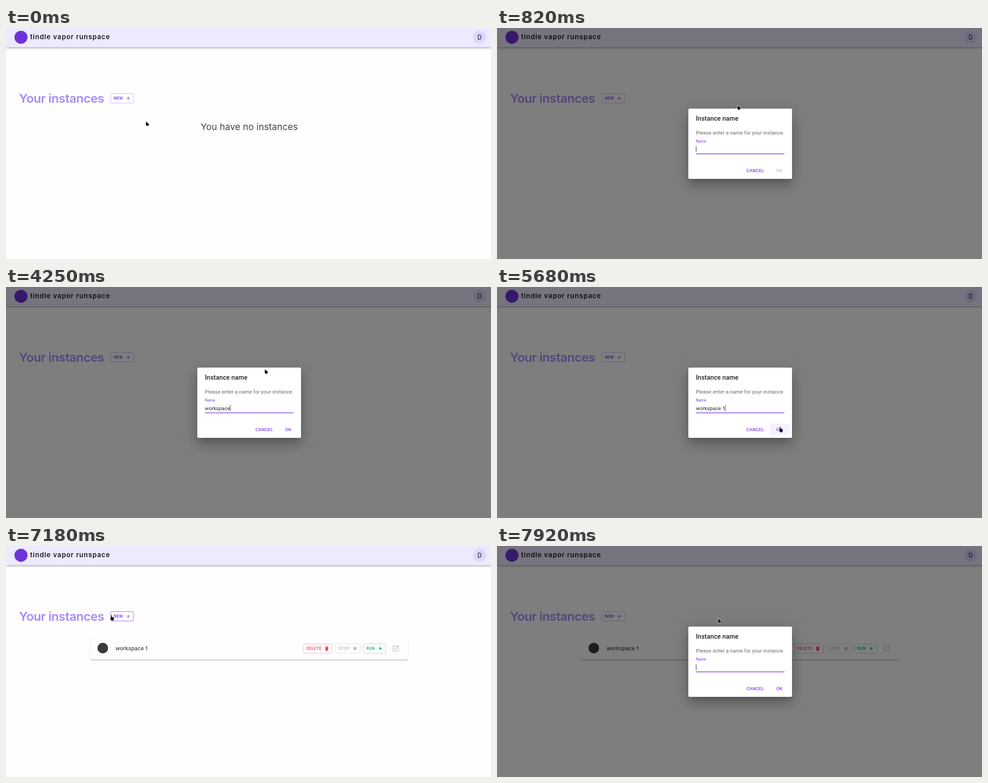
An HTML page that plays this animation: 1085 by 516 pixels, repeating every 7.99 s.

```html
<!DOCTYPE html>
<html lang="en">
<head>
<meta charset="utf-8">
<title>Instances</title>
<style>
  html, body { margin: 0; width: 100%; height: 100%; overflow: hidden; background: #fefefe; }
  #stage { position: absolute; left: 0; top: 0; width: 1085px; height: 516px; overflow: hidden; background: #fefefe; }
  .layer, svg { position: absolute; left: 0; top: 0; width: 1085px; height: 516px; }
  .box { position: absolute; }
  #header { left: 0; top: 0; width: 1085px; height: 43px; background: #ede9fe;
    box-shadow: 0 1.4px 2.8px -.7px rgba(0,0,0,.2), 0 2.8px 3.6px rgba(0,0,0,.14), 0 .7px 7px rgba(0,0,0,.12); }
  #card { opacity: 0; transform-origin: 544px 229.5px; }
  #cardBox { left: 188px; top: 204.5px; width: 712px; height: 49.5px; border-radius: 5px; background: #fefefe;
    box-shadow: 0 2px 1px -1px rgba(0,0,0,.2), 0 1px 1px rgba(0,0,0,.14), 0 1px 3px rgba(0,0,0,.14); }
  #backdrop { background: rgba(0,0,0,.5); opacity: 0; }
  #dialog { opacity: 0; }
  #dialogBox { left: 428px; top: 179.5px; width: 232px; height: 157px; border-radius: 3px; background: #fff;
    box-shadow: 0 8px 11px -5px rgba(0,0,0,.2), 0 17px 27px 2px rgba(0,0,0,.14), 0 6px 33px 6px rgba(0,0,0,.12); }
  text { font-family: Roboto, sans-serif; white-space: pre; }
  .inter { font-family: Inter, sans-serif; }
  .body { font-size: 11.38px; letter-spacing: .107px; }
  .action { font-size: 9.95px; font-weight: 500; letter-spacing: .284px; }
  .small { font-size: 9.24px; font-weight: 500; letter-spacing: .264px; fill: currentColor; }
  .button rect { fill: none; stroke: currentColor; stroke-width: .8; stroke-opacity: .5; }
  .button path { fill: currentColor; }
  .ripple { fill: #7c3aed; opacity: 0; }
  #accent { transform-box: fill-box; transform-origin: center; }
</style>
</head>
<body>
<div id="stage">
  <div id="header" class="box"></div>
  <svg viewBox="0 0 1085 516">
    <defs>
      <clipPath id="newClip"><rect x="234" y="146.5" width="52" height="21" rx="3"/></clipPath>
      <clipPath id="okClip"><rect x="611" y="305" width="44" height="26" rx="3"/></clipPath>
    </defs>
    <circle cx="33.5" cy="20.8" r="14.6" fill="#6d33d8"/>
    <text class="inter" x="54" y="24.5" font-size="15" font-weight="600" letter-spacing="1" fill="#1b1a20">tindle vapor runspace</text>
    <circle cx="1059.3" cy="20.5" r="14.3" fill="#ddd6fe"/>
    <text x="1059.3" y="25.6" font-size="14.2" text-anchor="middle" fill="#212121">D</text>
    <text class="inter" x="29" y="167" font-size="27.5" font-weight="600" letter-spacing="-.5" fill="#a78bfa">Your instances</text>
    <g id="newButton"></g>
    <g clip-path="url(#newClip)"><g transform="translate(250 157)"><circle id="newRipple" class="ripple" r="38"/></g></g>
    <text id="empty" class="inter" x="544.2" y="227.8" font-size="20.48" text-anchor="middle" fill="#47474b">You have no instances</text>
  </svg>

  <div id="card" class="layer">
    <div id="cardBox" class="box"></div>
    <svg viewBox="0 0 1085 516">
      <circle cx="216.5" cy="228" r="11.8" fill="#3b3b3d"/>
      <text class="inter" x="245" y="233.2" font-size="12" font-weight="500" fill="#3f3f46">workspace 1</text>
      <rect id="dash" x="343" y="229" width="4" height="1" fill="#bbb"/>
      <g id="cardButtons"></g>
    </svg>
  </div>

  <div id="backdrop" class="layer"></div>

  <div id="dialog" class="layer">
    <div id="dialogBox" class="box"></div>
    <svg viewBox="0 0 1085 516">
      <text x="445" y="207.4" font-size="14.22" font-weight="500" letter-spacing=".107" fill="#212121">Instance name</text>
      <text class="body" x="445" y="237.6" fill="#666">Please enter a name for your instance.</text>
      <text id="label" class="body" fill="#7c3aed">Name</text>
      <text id="typed" class="body" x="445" y="274.6" fill="#212121"></text>
      <rect id="caret" x="445" y="263.8" width=".9" height="13.4" fill="#111"/>
      <rect x="445" y="281" width="198" height=".8" fill="#8f8f8f"/>
      <rect id="accent" x="445" y="280.5" width="198" height="1.4" fill="#7c3aed"/>
      <text class="action" x="558" y="321.8" fill="#7c3aed">CANCEL</text>
      <rect id="okHover" x="611" y="305" width="44" height="26" rx="3" fill="#7c3aed" opacity="0"/>
      <text id="ok" class="action" x="624.8" y="321.8" fill="#7c3aed">OK</text>
      <g clip-path="url(#okClip)"><g transform="translate(633 316)"><circle id="okRipple" class="ripple" r="34"/></g></g>
    </svg>
  </div>

  <svg viewBox="0 0 1085 516">
    <g id="cursor" fill="#0d1020" stroke="#fff" stroke-width="1.4" stroke-linejoin="round" paint-order="stroke">
      <path id="arrow" d="M0 0V8.3L3 10 6.3 8.6 6.8 5.4Z"/>
      <path id="hand" d="M-1.1 1Q0-.6 1.1 1V4.6L5 5.5Q6.2 6 6 7.6L4.8 12.4H.2L-3 7.6Q-2.6 6-1.1 7.2Z"/>
    </g>
  </svg>
</div>

<script>
const LOOP = 7990;
const STANDARD = 'cubic-bezier(.4,0,.2,1)';
const DECEL = 'cubic-bezier(0,0,.2,1)';
const HOLD = 'step-end';
const PURPLE = '#7c3aed';
const $ = id => document.getElementById(id);

// rows: [time, value, easing towards the next row]
function track(el, prop, rows, ease = 'linear') {
  const all = [[0, rows[0][1], HOLD], ...rows, [LOOP, rows[rows.length - 1][1]]];
  const keys = all.map(([t, v, e]) => ({ offset: t / LOOP, [prop]: v, easing: e || ease }));
  el.animate(keys, { duration: LOOP, iterations: Infinity });
}

const ICON = {
  add: 'M19 13h-6v6h-2v-6H5v-2h6V5h2v6h6v2z',
  trash: 'M6 19c0 1.1.9 2 2 2h8c1.1 0 2-.9 2-2V7H6v12zM19 4h-3.5l-1-1h-5l-1 1H5v2h14V4z',
  stop: 'M6 6h12v12H6z',
  play: 'M8 5v14l11-7z',
  open: 'M19 19H5V5h7V3H5c-1.11 0-2 .9-2 2v14c0 1.1.89 2 2 2h14c1.1 0 2-.9 2-2v-7h-2v7zM14 3v2h3.59l-9.83 9.83 1.41 1.41L19 6.41V10h2V3h-7z'
};

const button = (x, y, w, label, icon, color) => `
  <g class="button" style="color:${color}">
    <rect x="${x + .4}" y="${y}" width="${w - .8}" height="21" rx="2.8"/>
    <text class="small" x="${x + 7}" y="${y + 13.8}">${label}</text>
    <path transform="translate(${x + w - 18.9} ${y + 4.1}) scale(.533)" d="${ICON[icon]}"/>
  </g>`;

$('newButton').innerHTML = button(234, 146.5, 52, 'NEW', 'add', PURPLE);

const OFF = '#bcbcbc';
$('cardButtons').innerHTML =
  button(665, 218.5, 65, 'DELETE', 'trash', '#f43f5e') +
  button(737, 218.5, 56, 'STOP', 'stop', OFF) +
  button(799, 218.5, 51, 'RUN', 'play', '#10b981') +
  `<g class="button" style="color:${OFF}"><path transform="translate(863 220.4) scale(.711)" d="${ICON.open}"/></g>`;

['#f43f5e', OFF, '#10b981', OFF].forEach((color, i) =>
  track($('cardButtons').children[i], 'color', [[6480, '#8c8c8c', STANDARD], [6730, color]]));

// Dialog and backdrop
const OPEN = [478, 7390], CLOSE = 6060;
const fade = [
  [OPEN[0], 0], [OPEN[0] + 225, 1], [CLOSE, 1], [CLOSE + 195, 0], [OPEN[1], 0], [OPEN[1] + 225, 1]
];
track($('backdrop'), 'opacity', fade, STANDARD);
track($('dialog'), 'opacity', fade, STANDARD);

const large = 'translate(445px,275px) scale(1)', shrunk = 'translate(445px,256px) scale(.75)';
track($('label'), 'transform', [
  [OPEN[0], large], [OPEN[0] + 200, shrunk], [7000, shrunk, HOLD], [7001, large], [OPEN[1], large], [OPEN[1] + 200, shrunk]
], DECEL);
track($('label'), 'fill', [[5950, PURPLE], [6120, '#666'], [7000, '#666', HOLD], [7001, PURPLE]]);
track($('accent'), 'transform', [
  [OPEN[0], 'scaleX(0)'], [OPEN[0] + 200, 'scaleX(1)'], [5950, 'scaleX(1)'], [6130, 'scaleX(0)'],
  [OPEN[1], 'scaleX(0)'], [OPEN[1] + 200, 'scaleX(1)']
], DECEL);
track($('ok'), 'fill', [[1690, '#bdbdbd'], [1910, PURPLE]], STANDARD);
track($('okHover'), 'opacity', [[5540, 0], [5720, .08], [6500, .08, HOLD], [6501, 0]]);

// Typing: time of each key and the caret offset after it
const keys = [
  [1570, 8.7], [1710, 15.2], [1910, 19.2], [2370, 25.1], [2840, 31], [2970, 37.5],
  [3240, 43.8], [3440, 49.9], [3650, 56], [4380, 59], [4450, 65.4]
];
const CLEAR = 7000;
[...'workspace 1'].forEach((char, i) => {
  const span = document.createElementNS('http://www.w3.org/2000/svg', 'tspan');
  span.textContent = char;
  $('typed').append(span);
  track(span, 'fillOpacity', [[0, 0], [keys[i][0], 1], [CLEAR, 0]], HOLD);
});
const shift = x => `translateX(${x}px)`;
track($('caret'), 'transform',
  [[0, shift(0)], ...keys.map(([t, x]) => [t, shift(x)]), [CLEAR, shift(0)]], HOLD);
track($('caret'), 'opacity',
  [0, OPEN[0], 1020, 1500, 2110, 2640, 3170, 4250, 4780, 5310, 5840, OPEN[1]].map((t, i) => [t, i % 2]), HOLD);

// Ripples
function ripple(el, times) {
  const grow = [], show = [];
  for (const t of times) {
    const end = Math.min(t + 550, LOOP - 1);
    grow.push([t, 'scale(0)', STANDARD], [end, 'scale(1)', HOLD]);
    show.push([t - 1, 0, HOLD], [t, .3], [t + 120, .3], [t + 430, 0]);
  }
  track(el, 'transform', grow);
  track(el, 'opacity', show);
}
ripple($('newRipple'), [390, 7300]);
ripple($('okRipple'), [5880]);
track($('newButton').querySelector('rect'), 'strokeOpacity',
  [[330, .5], [450, 1], [650, 1], [800, .5], [7090, .5], [7170, 1], [7630, 1], [7800, .5]]);

// Card replaces the empty message
track($('card'), 'opacity', [[CLOSE, 0], [CLOSE + 195, 1]], STANDARD);
track($('card'), 'transform', [[CLOSE, 'scale(.92)'], [CLOSE + 195, 'scale(1)']], STANDARD);
track($('empty'), 'opacity', [[CLOSE, 1], [CLOSE + 195, 0]], STANDARD);
track($('dash'), 'opacity', [[6255, 1], [6450, 0]]);

// Pointer
const path = [
  [40, 313, 209], [200, 283, 180], [350, 250.5, 153], [600, 250.5, 153], [720, 430, 165], [850, 569, 175], [1040, 579, 184],
  [4800, 579, 184], [4960, 620, 198], [5150, 677, 245], [5350, 664, 288], [5540, 640, 307], [5650, 633.5, 312],
  [6480, 633.5, 312], [6640, 560, 285], [6860, 380, 212], [7060, 250, 163], [7180, 235.5, 154], [7270, 250, 153],
  [7600, 250, 153], [7720, 330, 158], [7920, 494, 162], [7980, 530, 165]
];
track($('cursor'), 'transform', path.map(([t, x, y]) => [t, `translate(${x}px,${y}px)`]));
const swaps = [0, 330, 640, 5540, 6520, 7120, 7640];
track($('hand'), 'opacity', swaps.map((t, i) => [t, i % 2]), HOLD);
track($('arrow'), 'opacity', swaps.map((t, i) => [t, 1 - i % 2]), HOLD);
</script>
</body>
</html>
```
